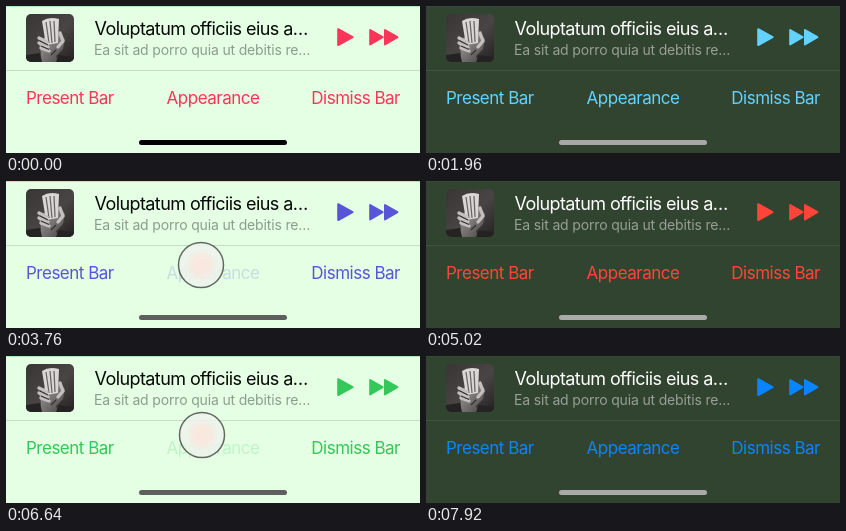
These frames come from a looping animation (414x147 px, 8 s). An HTML page:

```html
<!DOCTYPE html>
<html lang="en">
<head>
<meta charset="utf-8">
<title>Popup bar appearance</title>
<style>
  html, body { margin: 0; width: 100%; height: 100%; overflow: hidden; }
  svg { display: block; width: 414px; height: 147px; font-family: Inter, Roboto, sans-serif;
    --bg: #e4ffe4; --line: #c5dfc5; --top: #b4e6b6; --text: #050805; --sub: #8b9d8b; }
  svg.dark { --bg: #31442f; --line: #435341; --top: #384b36; --text: #fff; --sub: #989f96; }
  .title { font-size: 18px; letter-spacing: -.58px; fill: var(--text); }
  .sub { font-size: 14px; letter-spacing: -.16px; fill: var(--sub); }
  .btn { font-size: 17px; letter-spacing: -.5px; fill: var(--tint); }
  .icon { fill: var(--tint); stroke: var(--tint); stroke-width: 2; stroke-linejoin: round; }
</style>
</head>
<body>
<svg id="stage" viewBox="0 0 414 147">
  <defs>
    <linearGradient id="wall" x2="1" y2="1">
      <stop stop-color="#383535"/><stop offset=".55" stop-color="#4a4545"/><stop offset="1" stop-color="#242122"/>
    </linearGradient>
    <linearGradient id="skin" x2="1" y2="1">
      <stop stop-color="#a9a5a4"/><stop offset="1" stop-color="#484444"/>
    </linearGradient>
    <radialGradient id="glow">
      <stop stop-color="#fbe6dc"/><stop offset=".6" stop-color="#fbe6dc" stop-opacity=".7"/>
      <stop offset="1" stop-color="#fbe6dc" stop-opacity="0"/>
    </radialGradient>
    <clipPath id="cover"><rect x="20" y="8" width="48" height="48" rx="5"/></clipPath>
  </defs>
  <rect width="414" height="147" fill="var(--bg)"/>
  <rect width="414" height="1" fill="var(--top)"/>
  <rect y="64" width="414" height="1" fill="var(--line)"/>

  <g clip-path="url(#cover)">
    <rect x="20" y="8" width="48" height="48" fill="url(#wall)"/>
    <path d="M33 56L35 47L33 37L40 30L53 27L59 33L57 43L50 50L52 56Z" fill="url(#skin)"/>
    <path d="M36 15Q43 10 53 13L52 37L40 39Z" fill="#d9d6d5"/>
    <path d="M40 16L43 37M44 15L46 37M48 15L49 36" stroke="#6b6767" stroke-width="1.3"/>
    <path d="M33 32L41 36M33 37L42 41M35 42L43 45M54 27L57 35L52 41" fill="none"
      stroke="#c3bfbe" stroke-width="3.4" stroke-linecap="round" stroke-linejoin="round"/>
    <path d="M34 35L42 39M35 40L43 43.5M50 44L45 49" stroke="#353132" stroke-width="1.2"/>
    <path d="M20 56V49L34 47L36 56ZM50 56L53 49L68 51V56Z" fill="#252223"/>
  </g>

  <text class="title" x="88.5" y="28.5">Voluptatum officiis eius a…</text>
  <text class="sub" x="88" y="48.5">Ea sit ad porro quia ut debitis re…</text>
  <g class="icon">
    <path d="M332.2 23.2V39L346.6 31.1Z"/>
    <path d="M364.2 24V38.4L376.6 31.2ZM379 24V38.4L391.4 31.2Z"/>
  </g>

  <text class="btn" x="20" y="97.5">Present Bar</text>
  <text class="btn" id="look" x="207" y="97.5" text-anchor="middle">Appearance</text>
  <text class="btn" x="394" y="97.5" text-anchor="end">Dismiss Bar</text>
  <rect id="home" x="133" y="134" width="148" height="5" rx="2.5"/>
  <g id="touch">
    <circle id="disc" r="22.5" fill="#eef3ed" stroke="#000" stroke-width="1.5"/>
    <circle id="core" r="16" fill="url(#glow)"/>
  </g>
</svg>
<script>
  const LOOP = 8000, FADE = 300;
  const $ = id => document.getElementById(id);
  const stage = $('stage'), look = $('look'), home = $('home');
  const touch = $('touch'), disc = $('disc'), core = $('core');

  // Each tap: finger down, finger up, position, then the look it switches to.
  const taps = [
    { down: 1180, up: 1275, x: 207, y: 82, dark: true, tint: '#64d2ff' },
    { down: 2220, up: 2475, x: 196, y: 82, dark: false, tint: '#5856d6' },
    { down: 3440, up: 3785, x: 195, y: 84, dark: true, tint: '#ff453a' },
    { down: 5030, up: 5300, x: 196, y: 82, dark: false, tint: '#34c759' },
    { down: 6280, up: 6655, x: 196, y: 79, dark: true, tint: '#0a84ff' }
  ];
  const start = { up: 0, dark: false, tint: '#f9365a' };
  const clamp = v => Math.max(0, Math.min(1, v));
  const easeOut = v => 1 - (1 - v) ** 2;

  function homeGray(t, state) {
    if (state === start) return 0;
    if (!state.dark) return 94;
    return state === taps[0] ? 72 + 98 * clamp((t - state.up) / 700) : 170;
  }

  function drawTouch(t) {
    const tap = taps.find(p => t >= p.down && t < p.up + FADE);
    touch.style.display = tap ? '' : 'none';
    if (!tap) return;
    const shown = easeOut(clamp((t - tap.down) / 120));
    const gone = clamp((t - tap.up) / FADE);
    const scale = .8 + .2 * shown + .6 * easeOut(gone);
    touch.setAttribute('transform', `translate(${tap.x} ${tap.y}) scale(${scale})`);
    disc.style.fillOpacity = .85 * shown * (1 - gone) ** 2.2;
    disc.style.strokeOpacity = .58 * shown * (1 - gone ** 2);
    core.style.opacity = shown * clamp(1 - gone * 5);
  }

  function draw(t) {
    const state = taps.filter(p => t >= p.up).pop() || start;
    const pressed = taps.some(p => t >= p.down + 40 && t < p.up);
    const gray = Math.round(homeGray(t, state));
    stage.classList.toggle('dark', state.dark);
    stage.style.setProperty('--tint', state.tint);
    look.style.opacity = pressed ? .2 : 1;
    home.style.fill = `rgb(${gray},${gray},${gray})`;
    drawTouch(t);
  }

  const origin = performance.now();
  function tick() {
    draw((performance.now() - origin) % LOOP);
    requestAnimationFrame(tick);
  }
  tick();
</script>
</body>
</html>
```
